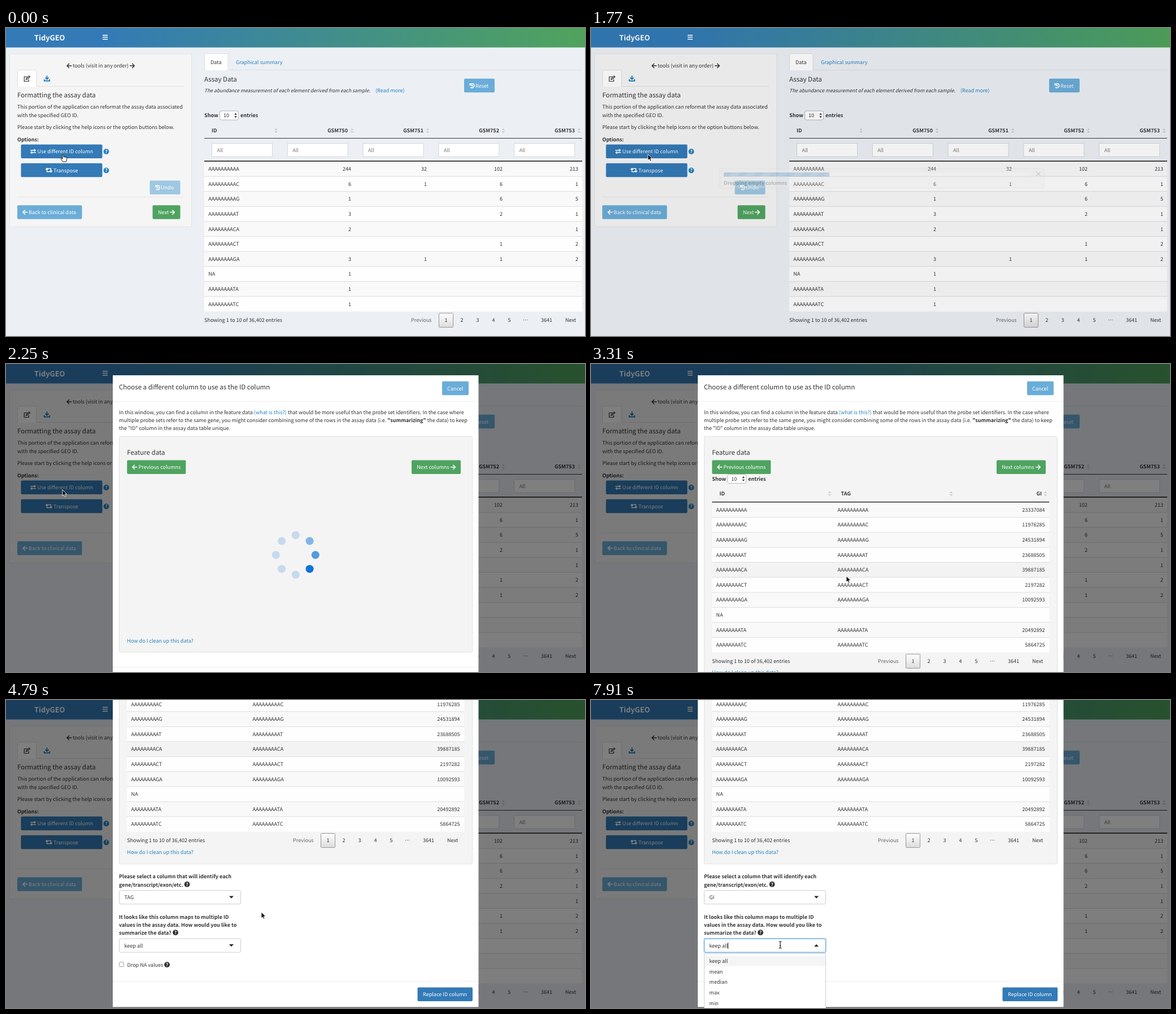
These frames come from a looping animation (1025 px wide and 546 px high, 8 s). An HTML page:

```html
<!DOCTYPE html>
<html>
<head>
<meta charset="utf-8">
<style>
html, body { margin: 0; width: 100%; height: 100%; overflow: hidden; background: #ecf0f5; }
svg { display: block; width: 1025px; height: 546px; text-rendering: geometricPrecision;
  font-family: "Noto Sans CJK SC", "Noto Sans CJK JP", "Noto Sans CJK KR", "Noto Sans CJK TC", "Noto Sans CJK", sans-serif; }
text { white-space: pre; }
</style>
</head>
<body>
<svg id="stage" viewBox="0 0 1025 546"></svg>
<script>
const $ = id => document.getElementById(id);
const BODY = 9.05, HEAD = 11.5, BLUE = '#337ab7', LIGHT = '#6aadd8', GREEN = '#4fa360', LINK = '#2583c0';
const BOLD = 'font-weight="700"', END = 'text-anchor="end"', MID = 'text-anchor="middle"';
const fill = c => `fill="${c}"`;

// y is the middle of the capitals
const text = (x, y, s, a = '', size = BODY) =>
  `<text x="${x}" y="${y + size * .37}" font-size="${size}" ${a.includes('fill=') ? '' : fill('#333')} ${a}>${s}</text>`;
const rect = (x, y, w, h, a) => `<rect x="${x}" y="${y}" width="${w}" height="${h}" ${a}/>`;
const line = (x1, x2, y, c = '#ddd', w = 1) => rect(x1, y - w / 2, x2 - x1, w, fill(c));
const path = (x, y, d, c, w = 1.5, f = 'none') =>
  `<path d="${d}" transform="translate(${x} ${y})" fill="${f}" stroke="${c}" stroke-width="${w}"/>`;
const group = (id, s, a = '') => `<g id="${id}" ${a}>${s}</g>`;

const ICON = {
  left: 'M5 -4L1 0L5 4M1 0H9.3',
  right: 'M4.3 -4L8.3 0L4.3 4M8.3 0H0',
  undo: 'M.8 -4V-1.2H3.6M1 -1.4A3.8 3.8 0 1 1 1.6 2.6M4.5 -2V.6H6.3',
  swap: 'M0 -2H9M6.7 -4L9 -2L6.7 0M10 2H1M3.3 0L1 2L3.3 4',
  retweet: 'M2.5 -3V2.8H7.5M.3 -1L2.5 -3.3L4.7 -1M4.5 -2.8H9.5V3M7.3 1L9.5 3.3L11.7 1',
  edit: 'M6.5 -3.5H.8V4.5H8.8V1M4 1.5L4.5 -.7L9.5 -5L11 -3.5L6 1Z',
  download: 'M5.5 -5V1M2.5 -1.7L5.5 1.3L8.5 -1.7M.8 1.5V4.3H10.2V1.5'
};
const icon = (name, x, y, c = '#fff', w) => path(x, y, ICON[name], c, w);
const button = (x, y, w, c, label, tx, name, ix) =>
  rect(x, y, w, 24.5, `rx="2" ${fill(c)}`) + text(tx, y + 12.5, label, fill('#fff')) + (name ? icon(name, ix, y + 12.3) : '');
const help = (x, y, c = '#333') =>
  `<circle cx="${x}" cy="${y}" r="4.9" ${fill(c)}/>` + text(x, y, '?', `${BOLD} ${MID} ${fill('#fff')}`, 8);
const sorter = (x, y) => path(x, y, 'M-2.6 -1L0 -4.4L2.6 -1ZM-2.6 1L0 4.4L2.6 1Z', 'none', 0, '#c9ced4');
const lengthPicker = (x, y) => text(x, y, 'Show', BOLD) +
  rect(x + 27.5, y - 8, 33, 16, 'rx="3" fill="#fff" stroke="#a5a5a5" stroke-width=".8"') + text(x + 34, y, '10') +
  path(x + 55.5, y, 'M-2.2 -1.2L0 -4.6L2.2 -1.2ZM-2.2 1.2L0 4.6L2.2 1.2Z', 'none', 0, '#333') + text(x + 64, y, 'entries', BOLD);

const IDS = ['A', 'C', 'G', 'T', 'CA', 'CT', 'GA', null, 'TA', 'TC'].map(s => s ? s.padStart(10, 'A') : 'NA');
const PITCH = 26.6;
const tableRows = (x, w, top, cells, hover) => IDS.map((id, i) => {
  const y = top + i * PITCH;
  return rect(x, y, w, PITCH, fill(i === hover ? '#f3f3f3' : i % 2 ? '#fefefe' : '#f9f9f9')) +
    (i ? line(x, x + w, y, '#ddd') : '') + text(x + 7.3, y + 13.3, id) + cells(i, y + 13.3);
}).join('');
const pager = (x, y) => rect(x + 49.5, y - 12.5, 25, 25, 'rx="1" fill="url(#page)" stroke="#979797"') +
  text(x, y, 'Previous', fill('#666')) + text(x + 273, y, 'Next') +
  [['1', 62], ['2', 90], ['3', 118], ['4', 146], ['5', 174], ['…', 202.5], ['3641', 240]].map(([s, d]) => text(x + d, y, s, MID)).join('');
const SHOWING = 'Showing 1 to 10 of 36,402 entries';

function page() {
  const cols = [611, 745, 879, 1013], names = ['GSM750', 'GSM751', 'GSM752', 'GSM753'];
  const counts = [[244, 6, 1, 3, 2, '', 3, 1, 1, 1], [32, 1, '', '', '', '', 1],
    [102, 6, 6, 2, '', 1, 1], [213, 1, 5, 1, 1, 2, 2]];
  return rect(0, 0, 1025, 546, fill('#ecf0f5')) + rect(0, 0, 1025, 34.5, 'fill="url(#bar)"') +
    text(50, 17, 'TidyGEO', `${BOLD} ${fill('#fff')}`, 12.8) +
    [12.8, 16.3, 19.8].map(y => line(171, 180, y, '#fff', 1.6)).join('') +
    rect(6.5, 46, 322, 306.5, 'rx="2" fill="#f5f5f5" stroke="#e3e3e3"') +
    icon('left', 107, 67, '#333') + text(118, 67, 'tools (visit in any order)') + icon('right', 219, 67, '#333') +
    line(20, 315, 103.5) + path(0, 0, 'M20.5 104V76.5Q20.5 74.5 22.5 74.5H52Q54 74.5 54 76.5V104', '#ddd', 1, '#fff') +
    icon('edit', 31.5, 90, '#333', 1.2) + icon('download', 67, 89.5, LINK, 1.9) +
    text(20, 119, 'Formatting the assay data', '', HEAD) +
    text(20, 140, 'This portion of the application can reformat the assay data associated') +
    text(20, 154.3, 'with the specified GEO ID.') +
    text(20, 176, 'Please start by clicking the help icons or the option buttons below.') +
    text(20, 197.5, 'Options:', BOLD) +
    button(26.5, 206.5, 144, BLUE, 'Use different ID column', 55.5, 'swap', 43) + help(177.5, 219, LINK) +
    button(26.5, 239.7, 144, BLUE, 'Transpose', 84, 'retweet', 70) + help(177.5, 252.5, LINK) +
    button(254.5, 270.5, 54, '#9dc7e2', 'Undo', 274, 'undo', 264) + line(20, 315, 299.5, '#e6e6e6') +
    button(20, 314.3, 114.5, LIGHT, 'Back to clinical data', 40, 'left', 29) +
    button(259.5, 314.3, 49, GREEN, 'Next', 269, 'right', 290) +
    line(351, 1020, 74.5) + path(0, 0, 'M351.5 75V47.5Q351.5 45.5 353.5 45.5H391Q393 45.5 393 47.5V75', '#ddd', 1, '#fff') +
    text(362, 61, 'Data') + text(407, 61, 'Graphical summary', fill(LINK)) + text(351, 90.3, 'Assay Data', '', HEAD) +
    text(351, 111, 'The abundance measurement of each element derived from each sample.', 'font-style="italic"', 8.6) +
    text(654, 111, '(Read more)', fill(LINK)) + button(811, 89.8, 54, LIGHT, 'Reset', 831, 'undo', 820.5) +
    lengthPicker(351, 155) + text(364, 182, 'ID', BOLD) + sorter(478, 182) +
    names.map((n, i) => text(cols[i] - 6, 182, n, `${BOLD} ${END}`) + sorter(cols[i] + 1.5, 182)).join('') +
    line(351, 1020, 195.5, '#333') +
    [0, 1, 2, 3, 4].map(i => rect(364.5 + i * 133.8, 204.5, 107, 23.5, 'fill="#fff" stroke="#d2d6de"') +
      text(373.5 + i * 133.8, 216.3, 'All', fill('#777'))).join('') +
    tableRows(351, 669, 236.5, (i, y) => cols.map((x, c) => text(x, y, counts[c][i] ?? '', END)).join('')) +
    line(351, 1020, 236, '#111', 1.5) + text(351, 518, SHOWING) + pager(717, 518);
}

const toast = () => rect(228, 249, 574, 35, 'rx="2" fill="#e8e8e8" stroke="#ccc"') +
  rect(235, 256, 545, 7.5, 'rx="2" fill="#f5f5f5"') + rect(235, 256, 187, 7.5, 'id="progress" fill="url(#stripes)"') +
  text(235, 275, 'Dropping empty columns', BOLD) + text(792, 259, '×', `${BOLD} ${MID} ${fill('#777')}`, 12);

const selectBox = (y, value, stroke, caret) => rect(200.5, y - 12, 215, 24, `rx="2" fill="#fff" ${stroke}`) +
  value + path(399, y, caret, 'none', 0, '#222');
function select(id, y, value) {
  return selectBox(y, text(209.5, y + .4, value, `id="${id}Value"`), 'stroke="#ccc"', 'M-4 -2.2H4L0 2Z');
}
function openSelect(id, y, caretX, options) {
  return group(id, rect(199, y - 13.5, 218, 27, 'rx="3" fill="#66afe9" opacity=".3"') +
    rect(200.5, y + 14.5, 215, 9 + 18.7 * options.length, 'fill="#fff" stroke="#d0d0d0"') +
    rect(201, y + 18, 214, 18.7, `id="${id}Hover" ${fill('#f5f5f5')}`) +
    options.map((s, i) => text(209.5, y + 27.5 + i * 18.7, s)).join('') +
    selectBox(y, text(209.5, y + .4, options[0]), 'stroke="#4d9bdb"', 'M-4 2H4L0 -2.2Z') +
    rect(caretX, y - 5, 1, 11, fill('#222')));
}
const Y1 = 627.5, Y2 = 713;

function modal() {
  const gi = [23337084, 11976285, 24531894, 23688505, 39887185, 2197282, 10092593, '', 20492892, 5864725];
  const panel = h => rect(200.5, 128.5, 625, h, 'rx="2" fill="#f4f4f4" stroke="#e0e0e0"');
  const cleanup = y => text(214.3, y, 'How do I clean up this data?', fill(LINK));
  const dots = [...Array(8).keys()].map(i => {
    const a = i * Math.PI / 4;
    return `<circle class="dot" cx="${512.8 + 35 * Math.sin(a)}" cy="${338.5 - 35 * Math.cos(a)}" r="7" fill="#0f73d9"/>`;
  }).join('');
  const labels = [[590.5, 'Please select a column that will identify each'], [605, 'gene/transcript/exon/etc.'],
    [662, 'It looks like this column maps to multiple ID'], [676.2, 'values in the assay data. How would you like to'],
    [690.5, 'summarize the data?']];
  const loading = rect(189, 20, 647.5, 562, fill('#fff')) + panel(382.5) + dots + cleanup(490.5) + line(189, 836, 537.5, '#eee');
  const loaded = rect(189, 20, 647.5, 802, fill('#fff')) + panel(440) + lengthPicker(214.3, 203.5) +
    text(227.5, 230, 'ID', BOLD) + sorter(422.5, 230) + text(442.5, 230, 'TAG', BOLD) + sorter(637.5, 230) +
    text(798, 230, 'GI', `${BOLD} ${END}`) + sorter(804.5, 230) +
    tableRows(214.3, 597, 245.2, (i, y) => (i === 7 ? '' : text(436.5, y, IDS[i])) + text(803.5, y, gi[i], END), 4) +
    line(214.3, 811.3, 244.7, '#111', 1.3) + text(214.3, 526.3, SHOWING) + pager(508, 526.8) + cleanup(547) +
    labels.map(([y, s]) => text(200, y, s, BOLD)).join('') + help(320.5, 604.5) + help(300, 690) +
    select('column', Y1, 'TAG') + select('summary', Y2, 'keep all') +
    rect(200.5, 742.5, 8, 8, 'rx="1.5" fill="#fff" stroke="#999" stroke-width=".9"') +
    text(214.5, 747, 'Drop NA values') + help(285, 747) + line(189, 836, 776.3, '#eee') +
    button(728.5, 787.3, 97.5, BLUE, 'Replace ID column', 738, '', 0) +
    openSelect('columnOpen', Y1, 227.5, ['TAG', 'GI']) +
    openSelect('summaryOpen', Y2, 242, ['keep all', 'mean', 'median', 'max', 'min']);
  return group('loading', loading) + group('loaded', loaded) +
    text(200, 41, 'Choose a different column to use as the ID column', '', HEAD) +
    button(772, 30.8, 47, LIGHT, 'Cancel', 781, '', 0) + line(189, 836, 66.5, '#eee') +
    text(200, 85.3, `In this window, you can find a column in the feature data <tspan fill="${LINK}">(what is this?)</tspan> that would be more useful than the probe set identifiers. In the case where`) +
    text(200, 99.7, `multiple probe sets refer to the same gene, you might consider combining some of the rows in the assay data (i.e. <tspan ${BOLD}>"summarizing"</tspan> the data) to keep`) +
    text(200, 114, 'the "ID" column in the assay data table unique.') + text(214.3, 157, 'Feature data', '', HEAD) +
    button(214.3, 170.5, 104, GREEN, 'Previous columns', 234.5, 'left', 223) +
    button(718, 170.5, 87, GREEN, 'Next columns', 727.3, 'right', 787);
}

const cursors = group('arrow', path(0, 0, 'M0 0V10.8L2.5 8.5L4.1 12.2L6 11.4L4.4 7.8H7.8Z', '#fff', .9, '#000')) +
  group('hand', path(0, 0, 'M0 1Q1 -.5 2 1V5Q3 4 4 5Q5 4.2 6 5.4Q7.4 4.8 7.7 6.3V9L6.5 13H.5L-2.8 8.4Q-3 6.6 -1.5 7.1L0 8.5Z', '#111', .9, '#fff')) +
  group('beam', path(0, 0, 'M-2.5 -6Q0 -6 0 -4.5Q0 -6 2.5 -6M0 -4.5V4.5M-2.5 6Q0 6 0 4.5Q0 6 2.5 6M-1.2 1.5H1.2', '#111', 1.1));

$('stage').innerHTML = `<defs>
  <linearGradient id="bar" gradientUnits="userSpaceOnUse" x1="165" x2="1025"><stop stop-color="#337ab7"/><stop offset="1" stop-color="#50a35c"/></linearGradient>
  <linearGradient id="page" x2="0" y2="1"><stop stop-color="#fff"/><stop offset="1" stop-color="#dcdcdc"/></linearGradient>
  <pattern id="stripes" width="28" height="28" patternUnits="userSpaceOnUse">
    <rect width="28" height="28" fill="#337ab7"/><path d="M0 28L14 14H28L14 28ZM14 14L28 0H42L28 14ZM0 0H14L0 14Z" fill="#fff" opacity=".15"/></pattern>
  </defs>` + page() + rect(0, 0, 1025, 546, 'id="backdrop"') + group('modal', modal()) + group('toast', toast()) + group('cursor', cursors);

const clamp = v => Math.max(0, Math.min(1, v));
const ramp = (t, a, b) => clamp((t - a) / (b - a));
const smooth = v => v * v * (3 - 2 * v);
const show = (id, on) => $(id).style.display = on ? '' : 'none';
const GLOW = [1, .7, .5, .2, .2, .2, .2, .2, 1];
const TRACK = [[0, 100, 224], [1600, 101, 224], [2200, 100, 223], [2650, 100, 223], [2840, 108, 224], [3285, 452, 376],
  [5000, 452, 376], [5500, 345, 349], [5900, 345, 349], [6250, 333, 398], [6500, 333, 398], [6700, 329, 396],
  [7080, 329, 396], [7420, 335, 434], [8000, 335, 434]];

function cursorAt(t) {
  const i = TRACK.findIndex(k => k[0] > t), [t0, x0, y0] = TRACK[i - 1], [t1, x1, y1] = TRACK[i];
  const e = smooth(ramp(t, t0, t1));
  return [x0 + (x1 - x0) * e, y0 + (y1 - y0) * e];
}

// The screen is sampled about seven times a second.
const sample = t => t < 2250 ? Math.floor(t / 147.5) * 147.5 : 2250 + Math.floor((t - 2250) / 148.8) * 148.8;

function draw(now) {
  const t = sample((now + 1) % 8000);
  const scroll = 277.8 * smooth(ramp(t, 3660, 4760));
  const drop = 148 * (1 - ramp(t, 1890, 2190)) ** 2;
  $('backdrop').setAttribute('opacity', .5 * ramp(t, 1755, 1905));
  $('modal').setAttribute('transform', `translate(0 ${-scroll - drop})`);
  $('modal').setAttribute('opacity', ramp(t, 1890, 2040));
  $('toast').setAttribute('opacity', .85 * ramp(t, 640, 890) * (1 - ramp(t, 1610, 1850)));
  $('progress').setAttribute('width', 187 * smooth(ramp(t, 740, 1330)));
  $('stripes').setAttribute('patternTransform', `translate(${-t * .014 % 28} 0)`);

  const loaded = t > 2650;
  show('loading', !loaded);
  show('loaded', loaded);
  const phase = (t - 2250) / 137.5 + 3;
  document.querySelectorAll('.dot').forEach((dot, i) => {
    const lag = ((phase - i) % 8 + 8) % 8, k = Math.floor(lag);
    dot.setAttribute('opacity', GLOW[k] + (GLOW[k + 1] - GLOW[k]) * (lag - k));
  });

  const [x, y] = cursorAt(t);
  const columnOpen = t > 5500 && t < 6550, summaryOpen = t > 7880;
  show('columnOpen', columnOpen);
  show('summaryOpen', summaryOpen);
  $('columnValue').textContent = t > 6550 ? 'GI' : 'TAG';
  $('columnOpenHover').setAttribute('y', Y1 + 18 + (y > 386 ? 18.7 : 0));

  const inField = c => x < 415 && Math.abs(y + scroll - c) < 12;
  const overColumn = t > 5000 && inField(Y1), overSummary = t > 5000 && inField(Y2);
  const beam = columnOpen && overColumn || summaryOpen && overSummary;
  const hand = !beam && (t < 1700 || columnOpen || overColumn || overSummary);
  show('beam', beam);
  show('hand', hand);
  show('arrow', !beam && !hand);
  $('cursor').setAttribute('transform', `translate(${x} ${y})`);
}

const start = performance.now();
(function frame() {
  draw(performance.now() - start);
  requestAnimationFrame(frame);
})();
</script>
</body>
</html>
```
